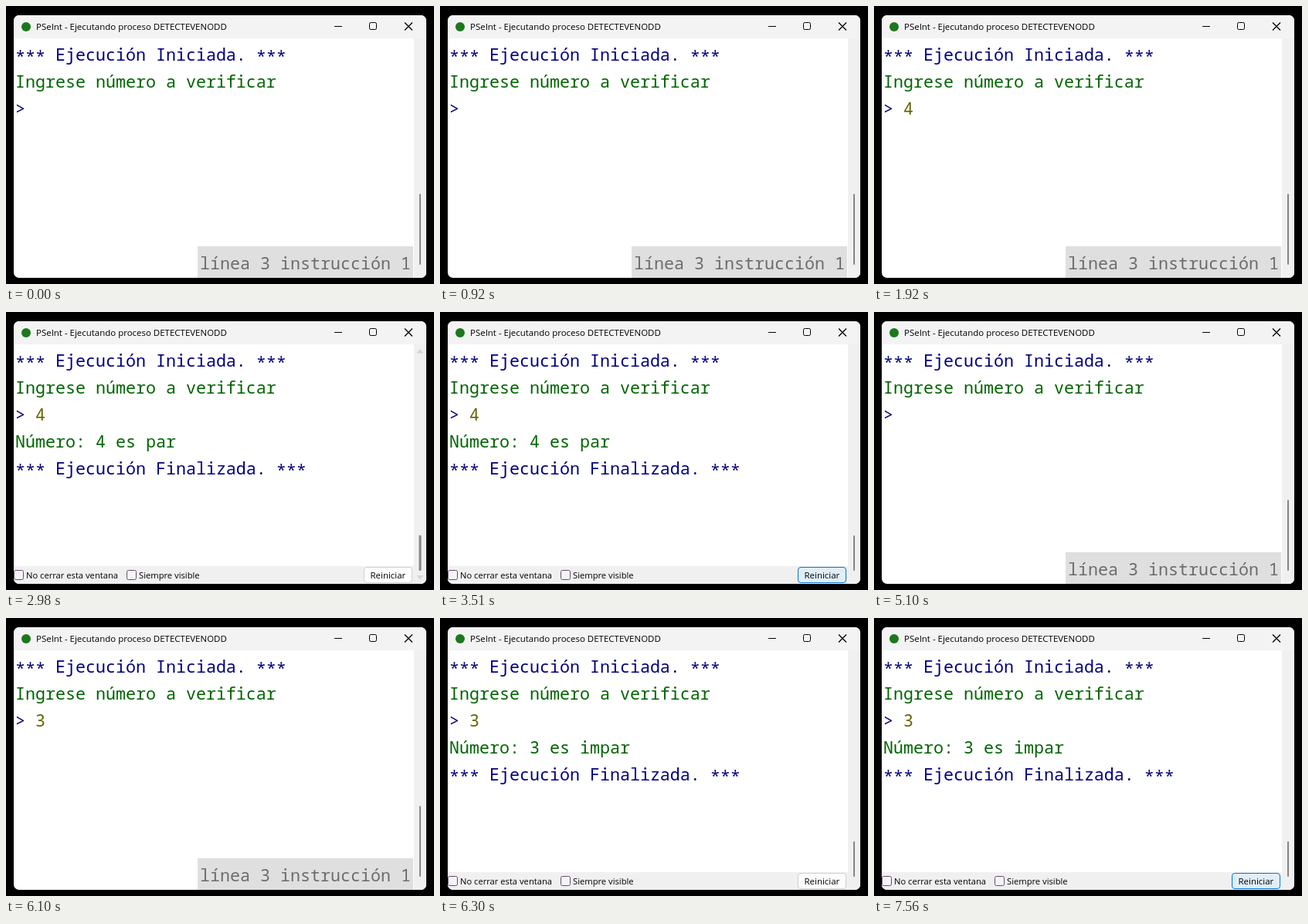
An HTML page for the animation above (8 s loop, 554 by 361 pixels).

```html
<!DOCTYPE html>
<html lang="es">
<head>
<meta charset="utf-8">
<title>Consola</title>
<style>
  html, body { margin: 0; width: 100%; height: 100%; overflow: hidden; background: #000; }
  svg { display: block; }
  text { white-space: pre; }
  .ui { font-family: "Open Sans", "Noto Sans", sans-serif; font-size: 11.2px; }
  .mono { font-family: "Noto Sans Mono", "DejaVu Sans Mono", monospace; font-size: 21.67px; }
  .navy { fill: #000080; }
  .green { fill: #006400; }
  .olive { fill: #646400; }
</style>
</head>
<body>
<svg width="554" height="361" viewBox="0 0 554 361">
  <defs>
    <clipPath id="frame"><rect x="10" y="12" width="534" height="341" rx="7"/></clipPath>
  </defs>
  <g clip-path="url(#frame)">
    <rect x="10" y="12" width="534" height="341" fill="#fff"/>
    <rect x="10" y="12" width="534" height="30" fill="#f3f3f3"/>
    <rect x="528" y="42" width="16" height="311" fill="#f0f0f0"/>

    <circle cx="26" cy="27" r="6" fill="#1c781c"/>
    <g id="titlebar" color="#000">
      <text class="ui" x="39" y="31" style="font-size:11.47px" fill="currentColor">PSeInt - Ejecutando proceso DETECTEVENODD</text>
      <g fill="none" stroke="currentColor">
        <path d="M425 26.5h10"/>
        <path d="M516 21.5l10 10m0-10l-10 10" stroke-width="1.3"/>
        <rect x="470.5" y="21.5" width="9" height="9" rx="1.8"/>
      </g>
    </g>

    <g id="output" class="mono">
      <text class="navy" x="12" y="71"><tspan dy="2.5">***</tspan><tspan dy="-2.5"> Ejecución Iniciada. </tspan><tspan dy="2.5">***</tspan></text>
      <text class="green" x="12" y="106">Ingrese número a verificar</text>
      <text class="navy" x="12" y="141">&gt;</text>
      <text class="olive" id="typed" x="38" y="141"></text>
    </g>
    <rect id="caret" y="123" width="2" height="23"/>

    <g id="status" class="mono">
      <rect x="248" y="312" width="279" height="41" fill="#dfdfdf"/>
      <text x="251" y="342" fill="#6c6c6c">línea 3 instrucción 1</text>
    </g>

    <g id="done">
      <g class="mono">
        <text class="green" id="result" x="12" y="176"></text>
        <text class="navy" x="12" y="211"><tspan dy="2.5">***</tspan><tspan dy="-2.5"> Ejecución Finalizada. </tspan><tspan dy="2.5">***</tspan></text>
      </g>
      <rect x="10" y="330" width="518" height="23" fill="#f0f0f0"/>
      <g fill="#f6f3f6" stroke="#62506a">
        <rect x="10.5" y="335.5" width="12" height="12" rx="2"/>
        <rect x="156.5" y="335.5" width="12" height="12" rx="2"/>
      </g>
      <text class="ui" x="26" y="346">No cerrar esta ventana</text>
      <text class="ui" x="172" y="346">Siempre visible</text>
      <rect id="button" x="463.5" y="331.5" width="62" height="20" rx="3.5"/>
      <text class="ui" x="471.5" y="346" style="font-size:11.47px">Reiniciar</text>
    </g>

    <path id="arrows" d="M531.5 53.5L536 48l4.5 5.5zM531.5 342L536 347.5l4.5-5.5z" fill="#858585"/>
    <rect id="thumb" rx="1" fill="#858585"/>
  </g>
</svg>
<script>
const LOOP = 8000, STEP = 66;
const el = id => document.getElementById(id);
const set = (id, attrs) => {
  for (const name in attrs) el(id).setAttribute(name, attrs[name]);
};
const show = (id, visible) => set(id, { visibility: visible ? 'visible' : 'hidden' });
const within = (t, from, to) => t >= from && t < to;

// Rises from 0 to 1 in a few discrete steps, the first one at `start`.
const fade = (t, start, steps) =>
  Math.min(1, Math.max(0, Math.floor((t - start) / STEP) + 1) / steps);

const mix = (from, to, k) =>
  `rgb(${from.map((v, i) => Math.round(v + (to[i] - v) * k))})`;

function draw(t) {
  const blank = within(t, 4100, 4170);
  const running = t < 1980 || within(t, 4170, 6300);
  const done = !running && !blank;
  const first = t < 4100;
  const digit = first ? '4' : '3';
  const hasDigit = first ? t >= 1390 : t >= 5840;

  set('titlebar', { color: within(t, 260, 920) ? '#929292' : '#000' });
  show('output', !blank);
  show('status', running);
  show('done', done);
  el('typed').textContent = hasDigit ? digit : '';
  el('result').textContent = `Número: ${digit} es ${first ? 'par' : 'impar'}`;

  const caretOn = [[460, 920], [1450, 1920], [4640, 5100], [5570, 6100]];
  show('caret', caretOn.some(([from, to]) => within(t, from, to)));
  set('caret', { x: hasDigit ? 51 : 38 });

  const hover = first ? fade(t, 3046, 3) : fade(t, 7420, 3);
  const press = first ? fade(t, 3970, 2) : 0;
  set('button', {
    fill: mix([253, 253, 253], [224 - 20 * press, 238 - 10 * press, 249 - 2 * press], hover),
    stroke: mix([208, 208, 208], [0, 120 - 36 * press, 212 - 59 * press], hover)
  });

  const scrollHover = fade(t, 2980, 4) - fade(t, 3370, 3);
  const width = 2 + 4 * scrollHover;
  const top = running ? 244 : 290;
  set('arrows', { opacity: scrollHover });
  set('thumb', { x: 536 - width / 2, y: top, width, height: 336 - top });
}

function tick() {
  draw(performance.now() % LOOP);
  requestAnimationFrame(tick);
}
tick();
</script>
</body>
</html>
```
